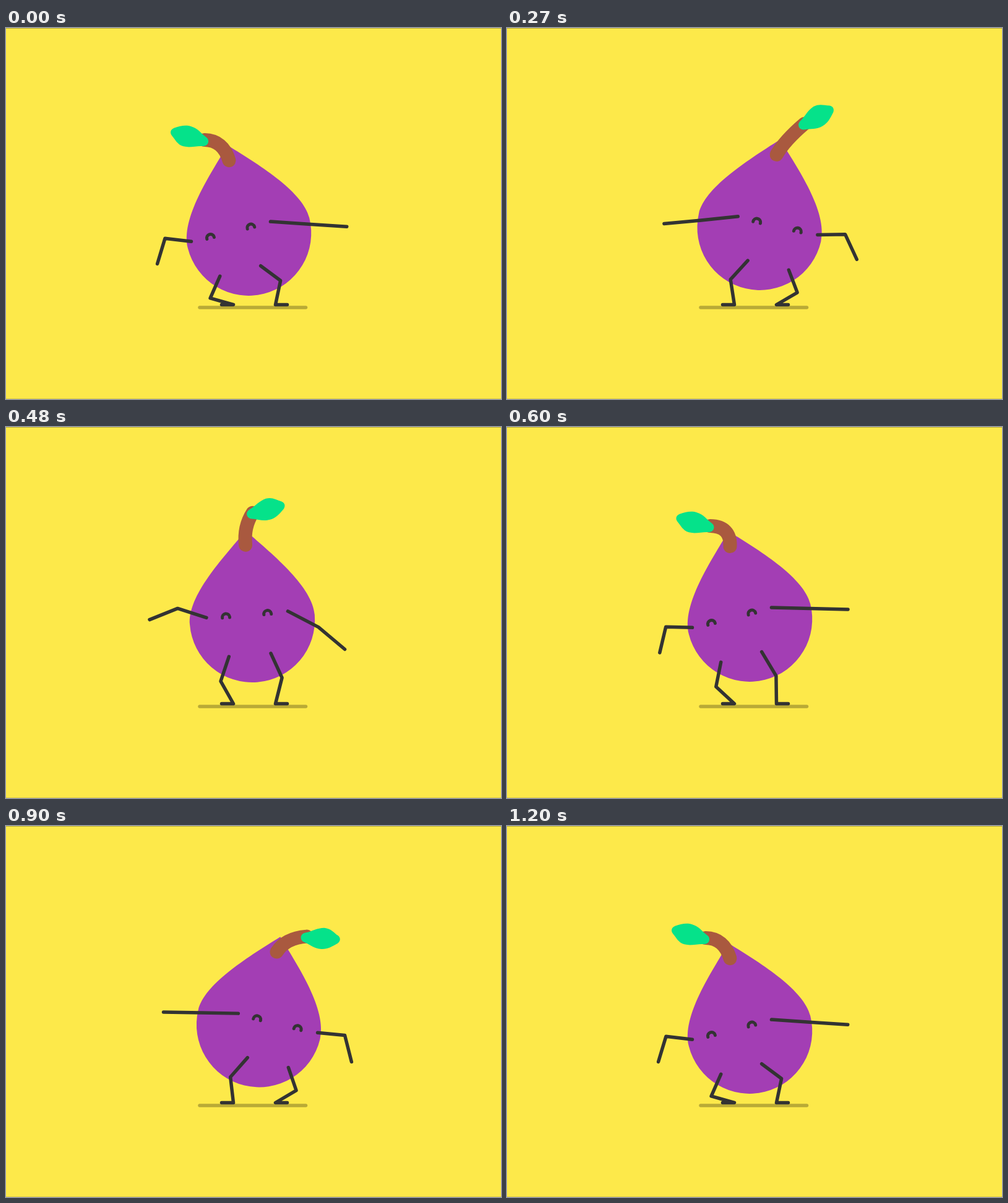
Recreate the animation shown at these times as an HTML page with a canvas. Size 800 by 600 pixels, loop 1.23 s.

```html
<!DOCTYPE html>
<html>
<head>
<meta charset="utf-8">
<title>Dancing fruit</title>
<style>
html, body { margin: 0; width: 100%; height: 100%; overflow: hidden; background: #fde94a; }
canvas { display: block; }
</style>
</head>
<body>
<canvas id="stage" width="800" height="600"></canvas>
<script>
const ctx = document.getElementById('stage').getContext('2d');
const { sin, cos, PI, hypot, floor } = Math;
const RAD = PI / 180, STEP = 30, LOOP = 1230, DANCE = 1200, SWAY = 600;
const INK = '#333333';

// Stem end relative to its root over one sway: [time, x, y]
const STEM_KEYS = [
  [0, -36, -33], [60, -44, -8], [120, -30, -28], [180, 2, -47],
  [225, 27, -51], [270, 45, -50], [300, 48.5, -25], [360, 54, -4],
  [420, 42, -28], [480, 9.5, -52], [530, -12, -50], [570, -32, -47]
];

const add = (p, x, y) => [p[0] + x, p[1] + y];
const polar = (p, angle, r) => add(p, r * cos(angle * RAD), r * sin(angle * RAD));

function spin(origin, angle, x, y) {
  const c = cos(angle * RAD), s = sin(angle * RAD);
  return add(origin, x * c - y * s, x * s + y * c);
}

// Periodic cubic interpolation through unevenly spaced keys
function track(keys, period, t) {
  const n = keys.length;
  const key = i => {
    const lap = floor(i / n), k = keys[i - lap * n];
    return [k[0] + lap * period, k[1], k[2]];
  };
  let i = 0;
  while (key(i + 1)[0] <= t) i++;
  const [a, b, c, d] = [key(i - 1), key(i), key(i + 1), key(i + 2)];
  const span = c[0] - b[0], s = (t - b[0]) / span;
  return [1, 2].map(j => {
    const m0 = (c[j] - a[j]) / (c[0] - a[0]) * span;
    const m1 = (d[j] - b[j]) / (d[0] - b[0]) * span;
    const e = s * s * (3 - 2 * s);
    return b[j] * (1 - e) + c[j] * e + m0 * s * (1 - s) * (1 - s) - m1 * s * s * (1 - s);
  });
}

function line(points, width = 5.5, color = INK) {
  ctx.beginPath();
  points.forEach(p => ctx.lineTo(...p));
  ctx.lineWidth = width;
  ctx.strokeStyle = color;
  ctx.stroke();
}

function drawBody(center, tilt, u) {
  const r = 101.2;
  const apex = add(center, 34.2 * u, -144 + 2 * u * u);
  const left = spin(center, tilt, -r, 0);
  const rightCtl = spin(center, tilt, r, -46 - 4 * u);
  const leftCtl = spin(center, tilt, -r, -46 + 4 * u);
  const right = spin(center, tilt, r, 0);
  ctx.beginPath();
  ctx.moveTo(...apex);
  ctx.bezierCurveTo(...polar(apex, 45.5 + tilt, 61 - 7 * u), ...rightCtl, ...right);
  ctx.arc(...center, r, tilt * RAD, tilt * RAD + PI);
  ctx.lineTo(...left);
  ctx.bezierCurveTo(...leftCtl, ...polar(apex, 134.5 + tilt, 61 + 7 * u), ...apex);
  ctx.fillStyle = '#a33eb4';
  ctx.fill();
}

function drawStem(root, theta, slow, time) {
  const near = (1 + cos(theta)) / 2 * slow;
  const offset = track(STEM_KEYS, SWAY, time % SWAY);
  const end = add(root, offset[0] - 3.7 * near, offset[1]);
  const bend = add(root,
    0.5 - 9.2 * cos(theta) + 4.7 * cos(2 * theta) - 5.5 * near,
    -27.5 - 5 * cos(theta));
  ctx.beginPath();
  ctx.moveTo(...root);
  ctx.quadraticCurveTo(...bend, ...end);
  ctx.lineWidth = 22;
  ctx.strokeStyle = '#a9593f';
  ctx.stroke();
  return end;
}

function drawLeaf(base, angle) {
  ctx.save();
  ctx.translate(...base);
  ctx.rotate(angle * RAD);
  ctx.fillStyle = '#05e28a';
  ctx.fill(new Path2D('M-1-8C10-11 18-17 29-17.5C40-17 44-11 52-6' +
    'C57-2 56 3 52 6.5C42 13 36 17 26 17C14 17 8 11-2 7.5C-10 5-10-6-1-8Z'));
  ctx.restore();
}

// side: -1 left, 1 right; the left arm dances half a sway later
function drawArm(shoulder, side, theta, slow) {
  const a = side > 0 ? theta : theta + PI;
  const c = cos(a), s = sin(a);
  const upper = 2.95 - 2.2 * cos(2 * a) - 20.9 * s
    + side * (3.3 - 1.5 * c) + slow * (1.95 * c - 0.7);
  const lower = 33.8 - 37.3 * c - 20.9 * s + 4.3 * cos(2 * a) + 1.6 * sin(2 * a)
    + side * (1.1 + 0.7 * c - 1.2 * s) + slow * (1.5 * c - 0.25);
  const length = 52.3 + 8.8 * c + side * 0.7;
  const reach = (p, deg) => add(p, side * length * cos(deg * RAD), length * sin(deg * RAD));
  const elbow = reach(shoulder, upper);
  line([shoulder, elbow, reach(elbow, lower)]);
}

function drawLeg(hip, side) {
  const ankle = [401.5 + side * 34, 447.5];
  const dx = ankle[0] - hip[0], dy = ankle[1] - hip[1];
  const chord = hypot(dx, dy);
  const bulge = side * (54.1 - 0.486 * chord) / chord;
  const knee = add(hip, dx / 2 + dy * bulge, dy / 2 - dx * bulge);
  line([hip, knee, ankle, add(ankle, side * 19, 0)]);
}

function drawEye(center, tilt) {
  ctx.beginPath();
  ctx.arc(...center, 6, tilt * RAD - PI - 0.08, tilt * RAD + 0.08);
  ctx.lineWidth = 5;
  ctx.strokeStyle = INK;
  ctx.stroke();
}

function draw(time) {
  const theta = 2 * PI * time / SWAY;
  const slow = cos(2 * PI * time / DANCE);
  const u = -cos(theta), uu = u * u;
  const bob = 10.5 * slow;
  const tilt = 13.9 * u - 0.25;
  const face = [400.75 + 38 * u, 311.4 + 7.8 * uu + bob];

  ctx.fillStyle = '#fde94a';
  ctx.fillRect(0, 0, 800, 600);
  ctx.fillStyle = '#b5a83b';
  ctx.fillRect(0, 0, 800, 1);
  ctx.fillStyle = '#d9c94a';
  ctx.fillRect(0, 599, 800, 1);

  line([[313, 452], [484.5, 452]], 5.5, '#b9aa36');
  drawBody([400.6 + 8.5 * u, 320.2 + uu + bob], tilt, u);
  const end = drawStem([399 + 38.5 * u, 198.8 + 4.8 * uu + bob], theta, slow, time);
  drawLeaf(add(end, -1.5, 2), -80 - 83 * cos(theta) - 94 * sin(theta));

  for (const side of [-1, 1]) {
    drawLeg(spin(face, tilt, side * 34, 65.3), side);
    drawArm(add(spin(face, tilt, side * 66, 0), 0.7, -0.5), side, theta, slow);
    drawEye(spin(face, tilt, side * 33.7, 1.6), tilt);
  }
}

ctx.lineCap = ctx.lineJoin = 'round';

function tick() {
  draw(floor(performance.now() % LOOP / STEP) * STEP);
  requestAnimationFrame(tick);
}
tick();
</script>
</body>
</html>
```
